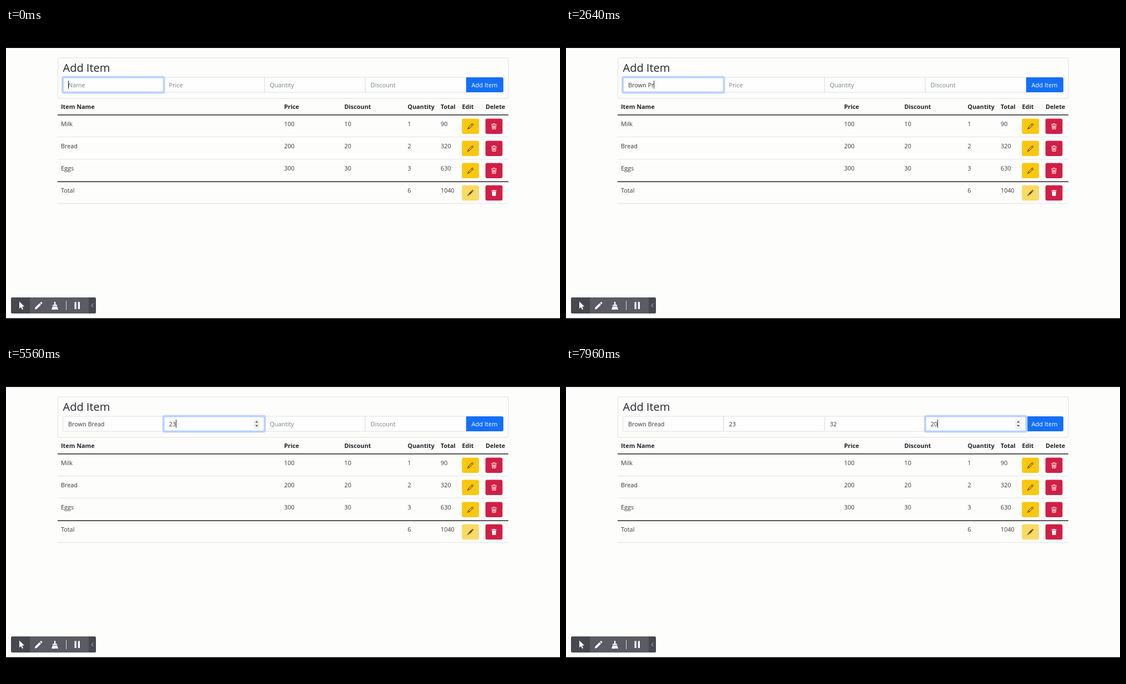
An HTML page for the animation above (8 s loop, 998 by 561 pixels).

```html
<!DOCTYPE html>
<html lang="en">
<head>
<meta charset="utf-8">
<title>Add Item</title>
<style>
  html, body { margin: 0; width: 100%; height: 100%; overflow: hidden; background: #000; }
  svg { display: block; width: 998px; height: 561px; }
  text { font: 10.85px "Open Sans", "Noto Sans", sans-serif; fill: #35383b; white-space: pre; }
  .title { font-size: 20px; font-weight: 500; fill: #212529; }
  .head { font-weight: 700; fill: #202326; }
  .button { font-size: 11.1px; fill: #fff; text-anchor: middle; }
  .placeholder { fill: #7b8085; }
  .outline { fill: none; stroke-width: 1.3; }
</style>
</head>
<body>
<svg id="stage" viewBox="0 0 998 561">
  <defs>
    <path id="pencil" class="outline" stroke="#332b12" d="M12.5.8 15.2 3.5 5.5 13.2 1 15 2.8 10.5ZM10.2 3.1 12.9 5.8M3 10.4 5.6 13"/>
    <path id="pencilFill" fill="#574c28" d="M12.9.1 15.9 3.1 14.2 4.8 11.2 1.8ZM10.5 2.5 13.5 5.5 6 13 3 10ZM2.3 11 5 13.7 0 16Z"/>
    <path id="trash" class="outline" stroke="#fff" d="M3 4 4 15H12L13 4M1.5 3.2H14.5M5.7 1.3H10.3M6 6V13M8 6V13M10 6V13"/>
    <path id="trashFill" fill="#fff" d="M1.8 1.4H6L6.5.4H9.5L10 1.4H14.2V3.4H1.8ZM2.8 4.2H13.2L12.3 15.8H3.7Z"/>
    <g id="spinner">
      <rect x="-5.5" y="94" width="11" height="17.5" fill="#f0f0f0"/>
      <path fill="#505050" d="M-2.7 100.3 0 97.2 2.7 100.3ZM-2.7 104.7 0 107.8 2.7 104.7Z"/>
    </g>
  </defs>

  <rect y="36" width="998" height="487.5" fill="#fdfdfc"/>
  <rect x="93.5" y="54" width="811.5" height="73" rx="3" fill="none" stroke="#dedfdf"/>
  <text class="title" x="102.5" y="78.5">Add Item</text>
  <g id="table"></g>
  <g id="fields"></g>
  <path fill="#146ff8" d="M829 89H893Q896 89 896 92V113Q896 116 893 116H829Z"/>
  <text class="button" x="862" y="106.6">Add Item</text>
  <g id="focus">
    <rect id="ring" y="88.5" width="182.6" height="28" rx="2" fill="none" stroke="#c2d8fd" stroke-width="4"/>
    <rect id="edge" y="89" width="181.6" height="27" rx="1" fill="none" stroke="#a9cafc"/>
    <use id="spin" href="#spinner"/>
    <rect id="caret" y="95" width="1" height="14.5" fill="#222"/>
  </g>

  <g id="toolbar">
    <rect x="9" y="486" width="153" height="29" rx="3" fill="#5a5b63"/>
    <path fill="#47484e" d="M12 486H43V515H12Q9 515 9 512V489Q9 486 12 486ZM149 486H159Q162 486 162 489V512Q162 515 159 515H149Z"/>
    <path fill="#fff" d="M24 493.5V506L27 503.4 29.2 508 31.2 507 29 502.6 33.2 502.2Z"/>
    <path fill="#fff" d="M52 507.5 52.6 504.3 60.3 496.6 63 499.3 55.2 507ZM61.2 495.7 62.7 494.2Q63.4 493.8 64.1 494.4L65.1 495.4Q65.6 496.2 65.1 496.9L63.8 498.4Z"/>
    <path fill="#fff" d="M86.8 494H89.2V499.3H92V501.6H84V499.3H86.8ZM83.8 502.5H92.2L94 508H90.7L90 506 89.4 508H82Z"/>
    <path fill="#fff" d="M123.5 494.3H126.7V507H123.5ZM129.8 494.3H133V507H129.8Z"/>
    <path fill="none" stroke="#d5d5d8" d="M108.5 492V509M157 497.3 154 500.5 157 503.7"/>
  </g>
</svg>
<script>
const $ = id => document.getElementById(id);
const svgNS = "http://www.w3.org/2000/svg";

function add(parent, tag, attrs, content = "") {
  const node = document.createElementNS(svgNS, tag);
  for (const key in attrs) node.setAttribute(key, attrs[key]);
  node.textContent = content;
  return parent.appendChild(node);
}

// Table
const columns = [99, 501, 609.5, 723.5, 783, 821.5, 864];
const rows = [
  ["Milk", 100, 10, 1, 90],
  ["Bread", 200, 20, 2, 320],
  ["Eggs", 300, 30, 3, 630],
  ["Total", "", "", 6, 1040]
];
const table = $("table");

function addRow(cells, y, type) {
  cells.forEach((cell, i) => add(table, "text", { x: columns[i], y, class: type }, cell));
}
function addIconButton(x, y, fill, icon) {
  add(table, "rect", { x, y, width: 30.7, height: 27.5, rx: 3, fill });
  add(table, "use", { href: "#" + icon, transform: `translate(${x + 9.6} ${y + 8}) scale(.725)` });
}
function addLine(y, stroke, width) {
  add(table, "path", { d: `M93 ${y}H905`, stroke, "stroke-width": width });
}

addRow(["Item Name", "Price", "Discount", "Quantity", "Total", "Edit", "Delete"], 146, "head");
addLine(156.8, "#202326", 1.5);
rows.forEach((cells, i) => {
  const y = 163.5 + i * 40.05, isTotal = i === 3;
  addRow(cells, y + 13.2, "cell");
  addIconButton(821.3, y, isTotal ? "#f9da63" : "#fbc70e", isTotal ? "pencilFill" : "pencil");
  addIconButton(863.7, y, "#d01f45", isTotal ? "trashFill" : "trash");
  if (i === 2) addLine(277.2, "#202326", 1.5);
  else addLine(Math.floor(y + 33) + .5, "#e3e4e5", 1);
});

// Form
const labels = ["Name", "Price", "Quantity", "Discount"];
const fieldX = i => 102.5 + i * 181.6;
const fields = labels.map((label, i) => {
  add($("fields"), "rect", { x: fieldX(i), y: 89, width: 181.6, height: 27, rx: i ? 0 : 2, fill: "#fefefe", stroke: "#dcdfe1" });
  return add($("fields"), "text", { x: fieldX(i) + 9.5, y: 106.5 });
});

// Each step: time in ms, focused field, its text
const steps = [
  [0, 0, ""],
  [440, 0, "B"], [640, 0, "Br"], [800, 0, "Bro"], [960, 0, "Brow"],
  [1160, 0, "Brown"], [1400, 0, "Brown "], [2400, 0, "Brown P"], [2560, 0, "Brown Pr"],
  [2840, 0, "Brown P"], [3000, 0, "Brown "], [3240, 0, "Brown B"], [3400, 0, "Brown Br"],
  [3560, 0, "Brown Bre"], [3680, 0, "Brown Brea"], [3840, 0, "Brown Bread"],
  [4400, 1, ""], [5000, 1, "2"], [5160, 1, "23"],
  [5600, 2, ""], [6040, 2, "3"], [6240, 2, "32"],
  [6760, 3, ""], [7320, 3, "2"], [7520, 3, "20"]
];
const loop = 8000, blink = 530;

function draw(time) {
  const values = ["", "", "", ""];
  let since = 0, focused = 0;
  for (const [start, field, value] of steps) {
    if (start > time) break;
    values[field] = value;
    focused = field;
    since = start;
  }
  fields.forEach((node, i) => {
    node.textContent = values[i] || labels[i];
    node.setAttribute("class", values[i] ? "value" : "placeholder");
  });

  const x = fieldX(focused);
  $("ring").setAttribute("x", x - .5);
  $("edge").setAttribute("x", x);
  $("spin").setAttribute("x", x + 167.5);
  $("spin").setAttribute("visibility", focused ? "visible" : "hidden");
  const width = values[focused] ? fields[focused].getComputedTextLength() : 0;
  $("caret").setAttribute("x", Math.round(x + 9.5 + width));
  $("caret").setAttribute("visibility", (time - since) % (2 * blink) < blink ? "visible" : "hidden");
}

function tick() {
  draw(performance.now() % loop);
  requestAnimationFrame(tick);
}
tick();
</script>
</body>
</html>
```
